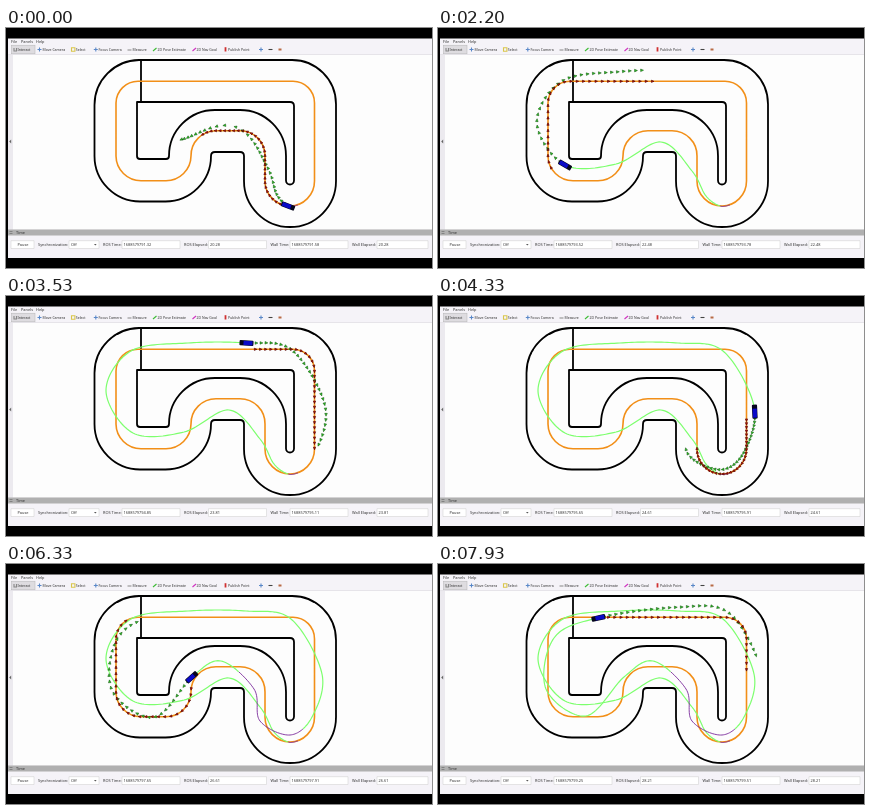
An HTML page for the animation above (8 s loop, 426 by 240 pixels).

```html
<!DOCTYPE html>
<html lang="en">
<head>
<meta charset="utf-8">
<title>Track simulation</title>
<style>
  html, body { margin: 0; width: 100%; height: 100%; overflow: hidden; background: #000; }
  svg { display: block; width: 100%; height: 100%; }
  text { font-family: "Noto Sans", "DejaVu Sans", sans-serif; font-size: 3.9px; fill: #333; white-space: pre; }
  .tools { font-size: 3.5px; }
  .wall { fill: none; stroke: #000; stroke-width: 1.8; stroke-linejoin: round; }
  .trail { fill: none; stroke: #7dff6e; stroke-width: 1.2; }
  .slow { stroke: #7a2a9a; stroke-width: .9; }
  .fields { fill: #fff; stroke: #ccc; stroke-width: .5; }
</style>
</head>
<body>
<svg viewBox="0 0 426 240" preserveAspectRatio="none">
  <rect width="426" height="240"/>
  <rect x="2" y="10.5" width="424" height="219.5" fill="#f5f3f8"/>
  <rect x="7" y="27" width="419" height="174.5" fill="#fdfdfd"/>
  <path d="M2 26.5H426" stroke="#dcdadf" stroke-width=".6"/>
  <rect x="2" y="27" width="5" height="175" fill="#eceaef"/>
  <path d="M5.2 111.5v4l-2-2z" fill="#666"/>
  <rect x="5.5" y="17.2" width="23.5" height="8.6" fill="#dedce0" stroke="#b4b4b4" stroke-width=".5"/>
  <text y="14.8"><tspan x="5">File</tspan><tspan x="15">Panels</tspan><tspan x="30">Help</tspan></text>
  <text y="22.9" class="tools"><tspan x="11.5">Interact</tspan><tspan x="36.5">Move Camera</tspan><tspan x="69.8">Select</tspan><tspan x="92.5">Focus Camera</tspan><tspan x="126.5">Measure</tspan><tspan x="151.5">2D Pose Estimate</tspan><tspan x="190.5">2D Nav Goal</tspan><tspan x="222">Publish Point</tspan></text>
  <g stroke-width="1.1" fill="none">
    <path d="M8 20v3h2.5v-3M121.5 22h4" stroke="#888"/>
    <path d="M31.5 21.5h4M33.5 19.5v4M87.8 21.5h4M89.8 19.5v4M253 21.5h4M255 19.5v4" stroke="#5a88c8"/>
    <path d="M65.5 19.8h3.4v3.4h-3.4z" stroke="#d9c64a"/>
    <path d="M147 23l3.5-3" stroke="#3dbb35"/>
    <path d="M186.5 23l3.5-3" stroke="#d030c0"/>
    <path d="M219.5 19.2v4.3" stroke="#d03030" stroke-width="1.8"/>
    <path d="M262.5 21.5h4" stroke="#444"/>
    <path d="M272.5 21.5h3" stroke="#b86b45" stroke-width="2"/>
  </g>

  <path class="wall" d="M133 32H286A44 44 0 0 1 330 76V153A46 46 0 0 1 238 153V128Q238 124 234 124H209Q205 124 205 128A45.5 45.5 0 0 1 159.5 173.5H134A45.5 45.5 0 0 1 88.5 128V77A45 45 0 0 1 133 32Z"/>
  <path class="wall" d="M131 74H284Q288 74 288 78V152.5A4 4 0 0 1 280 152.5V128A46 46 0 0 0 234 82H209A46 46 0 0 0 163 128Q163 131 160 131H134Q131 131 131 128Z"/>
  <path class="wall" d="M135 32V74"/>
  <path id="lane" d="M284 178A25 25 0 0 1 259 153V128A25 25 0 0 0 234 102.7H210A25 25 0 0 0 185 128A25 25 0 0 1 160 152.7H135A25 25 0 0 1 110 128V75A22 22 0 0 1 132 53.3H287A21.5 21.5 0 0 1 308.5 75V153A24.5 25 0 0 1 284 178Z" fill="none" stroke="#f28f18" stroke-width="1.6"/>
  <g id="trails"></g>
  <path id="plan" fill="#2fc425" stroke="#0d4a0a" stroke-width=".5"/>
  <path id="reference" fill="#d00c0c" stroke="#400000" stroke-width=".6"/>
  <g id="car">
    <rect x="-7" y="-2.6" width="14" height="5.2" rx="1" fill="#05051c"/>
    <rect x="-3" y="-2.1" width="9" height="4.2" fill="#0a0ac8"/>
  </g>

  <rect x="2" y="201.5" width="424" height="6" fill="#b0b0b0"/>
  <path d="M3.5 203.5h3M3.5 205.5h3" stroke="#666" stroke-width=".6"/>
  <path class="fields" d="M5 212.7h23v7.8h-23zM63 212.7h30v7.8h-30zM116 212.7h58v7.8h-58zM202.5 212.7h58v7.8h-58zM284 212.7h58v7.8h-58zM371 212.7h51v7.8h-51z"/>
  <path d="M88 216l1.3 1.6 1.3-1.6z" fill="#555"/>
  <text x="10" y="206">Time</text>
  <text y="218"><tspan x="11.5">Pause</tspan><tspan x="32">Synchronization:</tspan><tspan x="65">Off</tspan><tspan x="97">ROS Time:</tspan><tspan x="178">ROS Elapsed:</tspan><tspan x="264.5">Wall Time:</tspan><tspan x="346">Wall Elapsed:</tspan></text>
  <text id="rosTime" x="117.5" y="218"></text>
  <text id="rosElapsed" x="204" y="218"></text>
  <text id="wallTime" x="285.5" y="218"></text>
  <text id="wallElapsed" x="372.5" y="218"></text>
</svg>
<script>
const LOOP = 8000, FPS = 15, DOTS = 30, STEPS = 20, LAP = 4950;
const $ = id => document.getElementById(id);

// Driven route: x, y and, where the pace changes, the time of passing
const route = [
  [292, 177], [282, 178, 0], [268, 168], [254, 143], [223, 114, 1200], [178, 136], [127, 137, 2200],
  [100, 95], [125, 55], [182, 47], [240, 47, 3530], [285, 55], [316, 110], [306, 153], [284, 171],
  [254, 157, 5130], [248, 125], [215, 97], [186, 113, 6330], [148, 152], [108, 125], [116, 74],
  [160, 54, 7930], [240, 45], [290, 52], [320, 112], [310, 153]
];
const clampIndex = (i, list) => Math.max(0, Math.min(list.length - 1, i));

const spline = (a, b, c, d, u) =>
  b + u / 2 * (c - a + u * (2 * a - 5 * b + 4 * c - d + u * (3 * (b - c) + d - a)));

const samples = [];
for (let i = 0; i < route.length - 1; i++) {
  const near = [i - 1, i, i + 1, i + 2].map(k => route[clampIndex(k, route)]);
  for (let j = 0; j < STEPS; j++) {
    const [x, y] = [0, 1].map(axis => spline(...near.map(p => p[axis]), j / STEPS));
    const last = samples[samples.length - 1];
    samples.push({ x, y, s: last ? last.s + Math.hypot(x - last.x, y - last.y) : 0 });
  }
}

function onRoute(s) {
  const found = samples.findIndex(p => p.s > s);
  const i = found < 0 ? samples.length - 1 : Math.max(1, found);
  const a = samples[i - 1], b = samples[i], d = b.s - a.s, u = (s - a.s) / d;
  return { x: a.x + (b.x - a.x) * u, y: a.y + (b.y - a.y) * u, dx: (b.x - a.x) / d, dy: (b.y - a.y) / d };
}

const lane = $('lane'), laneLength = lane.getTotalLength();
function onLane(s) {
  const at = v => lane.getPointAtLength((v + laneLength) % laneLength);
  const a = at(s - .5), b = at(s + .5), d = Math.hypot(b.x - a.x, b.y - a.y) || 1;
  return { x: (a.x + b.x) / 2, y: (a.y + b.y) / 2, dx: (b.x - a.x) / d, dy: (b.y - a.y) / d };
}
const lanePoints = Array.from({ length: Math.floor(laneLength / 2) }, (_, i) => ({ s: i * 2, ...onLane(i * 2) }));

// Closest lane point that also runs the car's way
function nearestOnLane(car) {
  const cost = p => Math.hypot(p.x - car.x, p.y - car.y) + 15 * (1 - p.dx * car.dx - p.dy * car.dy);
  return lanePoints.reduce((best, p) => cost(p) < cost(best) ? p : best).s;
}

const passes = route.map(([, , t], i) => ({ t, s: samples[clampIndex(i * STEPS, samples)].s }))
  .filter(p => p.t !== undefined);
passes.forEach((p, i) => {
  const a = passes[clampIndex(i - 1, passes)], b = passes[clampIndex(i + 1, passes)];
  p.v = (b.s - a.s) / (b.t - a.t);
});

function distanceAt(t) {
  const i = Math.max(1, clampIndex(passes.findIndex(p => p.t > t) >>> 0, passes));
  const a = passes[i - 1], b = passes[i], span = b.t - a.t, u = (t - a.t) / span;
  return a.s + (b.s - a.s) * u * u * (3 - 2 * u) + span * u * (1 - u) * (a.v * (1 - u) - b.v * u);
}

// Look-ahead shrinks near the hairpin, once per lap
function horizonAt(t) {
  const phase = 2 * Math.PI * t / LAP;
  return 168 - 28 * Math.cos(phase) + 24 * Math.sin(phase) + 16 * Math.sin(2 * phase);
}

function arrow({ x, y, dx, dy }, r) {
  const point = (f, side) => `${(x + dx * f - dy * side).toFixed(2)} ${(y + dy * f + dx * side).toFixed(2)}`;
  return `M${point(r * 1.2, 0)}L${point(-r, r)}L${point(-r, -r)}Z`;
}
const arrows = (r, place) => Array.from({ length: DOTS }, (_, i) => arrow(place((i + 1) / DOTS), r)).join('');

function section(from, to, cls) {
  const el = document.createElementNS('http://www.w3.org/2000/svg', 'path');
  el.setAttribute('class', cls);
  return { from, to, el: $('trails').appendChild(el) };
}
const sections = [section(0, 10, 'trail slow'), section(10, 590, 'trail'),
  section(590, 695, 'trail slow'), section(695, Infinity, 'trail')];

function drawTrails(s) {
  for (const { from, to, el } of sections) {
    const end = Math.min(to, s);
    const points = [onRoute(from), ...samples.filter(p => p.s > from && p.s < end), onRoute(end)];
    const line = points.map(p => `${p.x.toFixed(2)} ${p.y.toFixed(2)}`).join('L');
    el.setAttribute('d', end > from ? 'M' + line : '');
  }
}

function draw(t) {
  const s = distanceAt(t), car = onRoute(s), start = nearestOnLane(car), horizon = horizonAt(t);
  const drift = 28 * Math.exp(-t / 450) - 4;
  drawTrails(s);
  $('reference').setAttribute('d', arrows(1.15, u => onLane(start + 4 + u * (horizon - 4))));
  $('plan').setAttribute('d', arrows(1.3, u => {
    const p = onRoute(s + u * horizon * .94);
    return { ...p, x: p.x - p.dy * drift * u, y: p.y + p.dx * drift * u };
  }));
  const angle = Math.atan2(car.dy, car.dx) * 180 / Math.PI;
  $('car').setAttribute('transform', `translate(${car.x} ${car.y}) rotate(${angle})`);

  const elapsed = 20.28 + t / 1000;
  $('rosElapsed').textContent = $('wallElapsed').textContent = elapsed.toFixed(2);
  $('rosTime').textContent = (1688579771.04 + elapsed).toFixed(2);
  $('wallTime').textContent = (1688579771.3 + elapsed).toFixed(2);
}

let shown = -1;
function tick() {
  const frame = Math.floor((performance.now() % LOOP + 4) * FPS / 1000) % (LOOP * FPS / 1000);
  if (frame !== shown) draw((shown = frame) * 1000 / FPS);
  requestAnimationFrame(tick);
}
tick();
</script>
</body>
</html>
```
